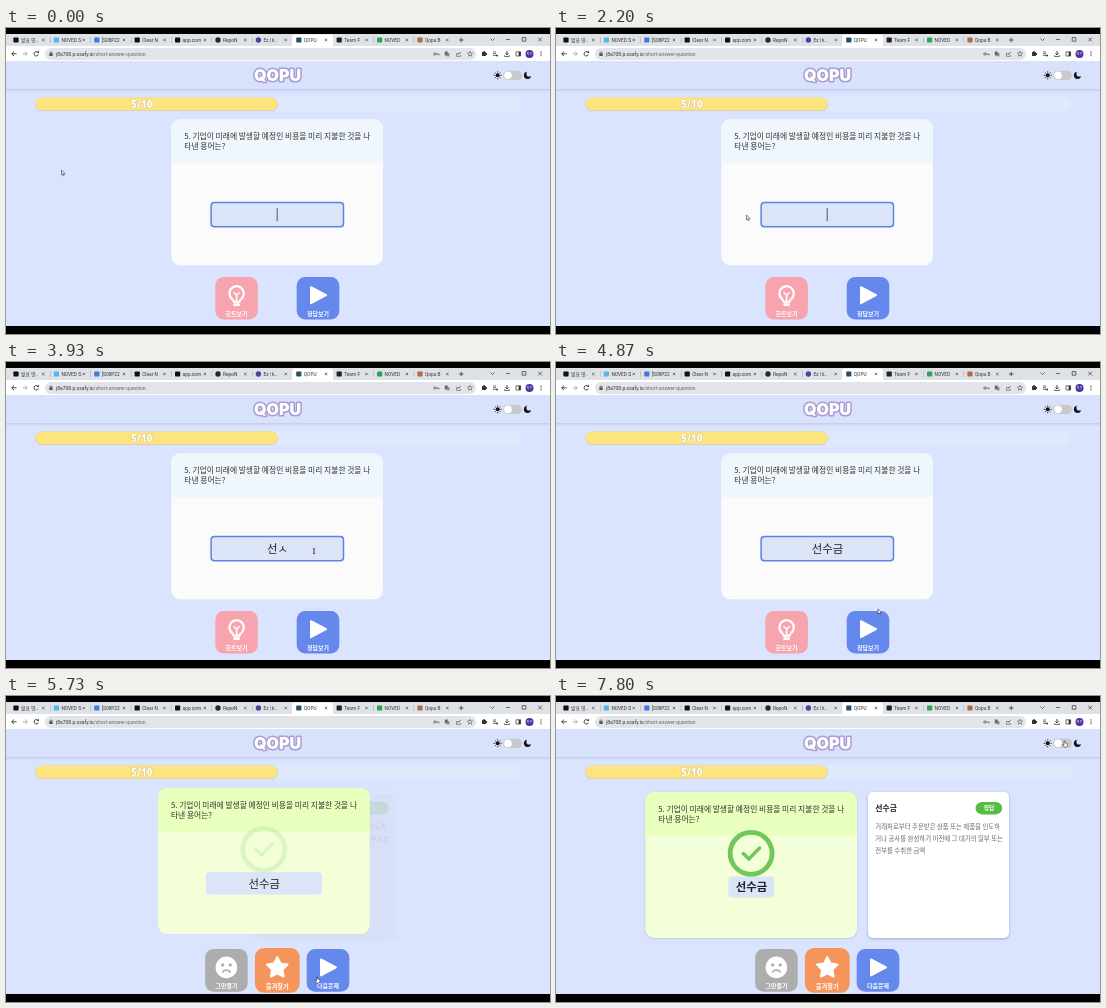
Write an HTML page with a canvas that moves like this. It is 544 px wide and 306 px high and loops after 7.87 s.

```html
<!DOCTYPE html>
<html lang="ko">
<head>
<meta charset="utf-8">
<title>QOPU</title>
<style>
html, body { margin: 0; width: 100%; height: 100%; overflow: hidden; background: #000; }
canvas { display: block; width: 100vw; height: 100vh; }
</style>
</head>
<body>
<canvas id="stage" width="544" height="306"></canvas>
<script>
const c = document.getElementById('stage').getContext('2d');
const LOOP = 7870, STEP = 200 / 3;
const KR = '"Noto Sans CJK KR", "Noto Sans CJK", sans-serif';
const UI = 'Roboto, "Noto Sans CJK KR", sans-serif';
const GREEN_AT = 5270, RESULT_AT = 5600;

const clamp = v => Math.max(0, Math.min(1, v));
const ease = v => { v = clamp(v); return v * v * (3 - 2 * v); };
const mix = (a, b, p) => a + (b - a) * p;
const blend = (a, b, p) => `rgb(${a.map((v, i) => Math.round(mix(v, b[i], p)))})`;

function rect(x, y, w, h, fill) {
  c.fillStyle = fill;
  c.fillRect(x, y, w, h);
}
function round(x, y, w, h, r, fill) {
  c.beginPath();
  c.roundRect(x, y, w, h, r);
  c.fillStyle = fill;
  c.fill();
}
function dot(x, y, r, fill) {
  c.beginPath();
  c.arc(x, y, r, 0, 7);
  c.fillStyle = fill;
  c.fill();
}
function ring(x, y, r, color, width, from = 0, to = Math.PI * 2) {
  c.beginPath();
  c.arc(x, y, r, from, to);
  c.strokeStyle = color;
  c.lineWidth = width;
  c.stroke();
}
function line(points, color, width) {
  c.beginPath();
  points.forEach(([x, y]) => c.lineTo(x, y));
  c.strokeStyle = color;
  c.lineWidth = width;
  c.stroke();
}
function poly(points, fill) {
  c.beginPath();
  points.forEach(([x, y]) => c.lineTo(x, y));
  c.closePath();
  c.fillStyle = fill;
  c.fill();
}
// y is the visual middle of the line
function text(s, x, y, size, color, { weight = 400, align = 'left', font = KR } = {}) {
  c.font = `${weight} ${size}px ${font}`;
  c.textAlign = align;
  c.fillStyle = color;
  c.fillText(s, x, y + size * 0.37);
}
function withShadow(color, blur, dy, draw) {
  c.save();
  c.shadowColor = color;
  c.shadowBlur = blur;
  c.shadowOffsetY = dy;
  draw();
  c.restore();
}

const tabs = [
  ['발표 영..', '#111'], ['NOVED S', '#55b5ee'], ['[S08P22', '#3d7de0'], ['Clear N', '#111'],
  ['app.com', '#111'], ['RepoN', '#24292e'], ['Ez | k..', '#4a459c'], ['QOPU', '#24506a'],
  ['Team F', '#222'], ['NOVED', '#2ba35b'], ['Qopu B', '#b06a45']
];

function drawBrowser() {
  rect(0, 6, 544, 12, '#dee1e6');
  rect(0, 18, 544, 15, '#fff');
  round(286, 6.5, 41, 13, [3, 3, 0, 0], '#fff');
  tabs.forEach(([name, color], i) => {
    const x = 10 + i * 40.4;
    if (i === 5 || i === 6) dot(x, 12, 2.7, color);
    else round(x - 2.6, 9.4, 5.2, 5.2, 0.8, color);
    text(name, x + 5, 12, 4.8, '#333', { font: UI });
    const k = x + 27.3;
    line([[k - 1.2, 10.8], [k + 1.2, 13.2]], '#444', 0.7);
    line([[k + 1.2, 10.8], [k - 1.2, 13.2]], '#444', 0.7);
    if (i < 10 && i !== 6 && i !== 7) rect(x + 34, 9, 0.5, 6, '#a5a8ad');
  });
  line([[453, 12], [457.5, 12]], '#333', 0.8);
  line([[455.2, 9.8], [455.2, 14.2]], '#333', 0.8);
  line([[484.5, 10.5], [486.5, 12.5], [488.5, 10.5]], '#333', 0.7);
  line([[500, 11.5], [504, 11.5]], '#333', 0.7);
  c.strokeRect(516.2, 9.6, 3.6, 3.6);
  line([[532.3, 9.7], [536, 13.4]], '#333', 0.7);
  line([[536, 9.7], [532.3, 13.4]], '#333', 0.7);

  line([[10.6, 25.8], [5.8, 25.8]], '#333', 0.9);
  line([[8, 23.5], [5.7, 25.8], [8, 28.1]], '#333', 0.9);
  line([[16.5, 25.8], [21.3, 25.8]], '#aaa', 0.9);
  line([[19, 23.5], [21.3, 25.8], [19, 28.1]], '#aaa', 0.9);
  ring(30.3, 25.8, 2.2, '#333', 0.9, 0.3, 5.5);
  poly([[30.8, 25], [33, 25], [33, 22.8]], '#333');

  round(39, 20, 431, 12, 6, '#e1e4e8');
  rect(43.3, 25.2, 3.4, 2.8, '#555');
  ring(45, 25, 1.1, '#555', 0.7, Math.PI, 0);
  const host = 'j8a708.p.ssafy.io';
  text(host, 50, 26, 5, '#333', { font: UI });
  text('/short-answer-question', 50 + c.measureText(host).width, 26, 5, '#666', { font: UI });

  ring(428.8, 26, 1.1, '#555', 0.8);
  line([[430, 26], [433, 26], [433, 27.3]], '#555', 0.8);
  round(438.8, 23.5, 3, 4, 0.4, '#666');
  rect(441, 25, 2.4, 3.4, '#888');
  line([[454, 25.5], [450.5, 25.5], [450.5, 28.3], [454.5, 28.3], [454.5, 27]], '#666', 0.7);
  line([[452, 26.6], [455, 24]], '#666', 0.7);
  c.strokeStyle = '#555';
  c.lineWidth = 0.6;
  star(464, 26, 2.7, 1.2);
  c.stroke();
  round(476, 24, 4, 4, 0.5, '#333');
  dot(478, 23.8, 0.9, '#333');
  dot(480.3, 26, 0.9, '#333');
  for (let i = 0; i < 3; i++) line([[487, 24 + i * 1.7], [490, 24 + i * 1.7]], '#333', 0.7);
  dot(491, 27.5, 1, '#333');
  line([[501, 23], [501, 26.8]], '#333', 0.9);
  line([[499.3, 25.2], [501, 27], [502.7, 25.2]], '#333', 0.8);
  line([[498.6, 27.2], [498.6, 28.5], [503.4, 28.5], [503.4, 27.2]], '#333', 0.7);
  c.strokeRect(510, 23.8, 4.6, 4.2);
  rect(512.6, 23.8, 2, 4.2, '#333');
  dot(523.5, 26, 4, '#4b2fa5');
  text('지우', 523.5, 26, 3.2, '#fff', { align: 'center' });
  for (let i = -1; i < 2; i++) dot(535, 25.8 + i * 1.9, 0.6, '#333');
}

function star(x, y, outer, inner) {
  c.beginPath();
  for (let i = 0; i < 10; i++) {
    const a = i * Math.PI / 5 - Math.PI / 2, r = i % 2 ? inner : outer;
    c.lineTo(x + r * Math.cos(a), y + r * Math.sin(a));
  }
  c.closePath();
}

function drawHeader() {
  rect(0, 33, 544, 265, '#dbe4fe');
  rect(0, 33, 544, 29, '#d9e2fc');
  rect(0, 61.4, 544, 1, '#b9c4e2');
  rect(0, 62.4, 544, 1, '#cfd9f5');

  c.font = '900 16px Inter, sans-serif';
  c.textAlign = 'center';
  c.strokeStyle = '#a99bd4';
  c.lineWidth = 3;
  c.strokeText('QOPU', 271.5, 53.2);
  c.fillStyle = '#fff';
  c.fillText('QOPU', 271.5, 53.2);

  dot(491.7, 47.3, 2, '#111');
  for (let i = 0; i < 8; i++) {
    const a = i * Math.PI / 4, x = Math.cos(a), y = Math.sin(a);
    line([[491.7 + x * 2.8, 47.3 + y * 2.8], [491.7 + x * 4, 47.3 + y * 4]], '#111', 0.9);
  }
  round(497, 42.8, 19, 9.2, 4.6, '#c9c9cb');
  dot(502, 47.4, 3.8, '#fff');
  dot(521.5, 47.3, 3.6, '#111');
  dot(523.3, 45.7, 2.9, '#d9e2fc');

  round(29.5, 68.5, 486, 15, 7.5, '#dfe9fb');
  withShadow('rgba(90,90,120,.35)', 1, 0.3, () => round(29.5, 69.5, 242, 13, 6.5, '#fde47c'));
  withShadow('rgba(60,60,60,.5)', 1, 0.7, () =>
    text('5/10', 135.7, 76.2, 9.6, '#fff', { weight: 800, align: 'center', font: '"Open Sans", sans-serif' }));
}

const icons = {
  bulb(x, y) {
    ring(x, y - 1.8, 7.2, '#fff', 2.3, 2.2, 7.2);
    line([[x - 4, y + 4], [x - 3, y + 6.5], [x + 3, y + 6.5], [x + 4, y + 4]], '#fff', 2);
    line([[x - 3, y - 3], [x, y], [x + 3, y - 3]], '#fff', 1.5);
    line([[x, y], [x, y + 6]], '#fff', 1.6);
    round(x - 3.3, y + 8, 6.6, 2.8, 1, '#fff');
  },
  play(x, y, tint = '#fff') {
    poly([[x - 7, y - 8], [x + 8, y], [x - 7, y + 8]], tint);
    line([[x - 7, y - 8], [x + 8, y], [x - 7, y + 8], [x - 7, y - 8], [x + 8, y]], tint, 2);
  },
  sad(x, y) {
    dot(x, y, 10.8, '#fff');
    dot(x - 3.8, y - 2.5, 1.6, '#adadad');
    dot(x + 3.8, y - 2.5, 1.6, '#adadad');
    ring(x, y + 7.3, 4.6, '#adadad', 1.6, 3.6, 5.82);
  },
  star(x, y) {
    star(x, y + 0.6, 10.2, 5.2);
    c.fillStyle = c.strokeStyle = '#fff';
    c.lineWidth = 2;
    c.fill();
    c.stroke();
  }
};

function button(x, y, color, icon, label, scale = 1, tint) {
  c.save();
  c.translate(x, y);
  c.scale(scale, scale);
  round(-21.3, -21.3, 42.6, 42.6, 8.5, color);
  icons[icon](0, -3, tint);
  text(label, 0, 15.1, 6, tint || '#fff', { weight: 700, align: 'center' });
  c.restore();
}

const typed = [[3400, 'ㅅ'], [3530, '서'], [3660, '선'], [3870, '선ㅅ'], [4000, '선수'], [4200, '선숙'], [4330, '선수그'], [4470, '선수금']];

function drawCard(t, p) {
  const g = clamp((t - GREEN_AT) / 130);
  const x = mix(165.3, 89.3, p), y = mix(91.3, 96, p);

  if (p > 0) {
    c.globalAlpha = p;
    const sx = mix(235, 312, p);
    withShadow('rgba(70,85,130,.4)', 3, 1, () => round(sx, 96, 141, 146, 5, '#fff'));
    text('선수금', sx + 7.3, 112, 7.8, '#222', { weight: 700 });
    round(sx + 107.6, 106, 26.5, 12.4, 6.2, '#59bb42');
    text('정답', sx + 121, 112.2, 5.8, '#fff', { weight: 700, align: 'center' });
    ['거래처로부터 주문받은 상품 또는 제품을 인도하', '거나 공사를 완성하기 이전에 그 대가의 일부 또는', '전부를 수취한 금액']
      .forEach((s, i) => text(s, sx + 7.3, 131 + i * 12, 6.4, '#666'));
    c.globalAlpha = 1;
  }

  const body = blend([251, 251, 252], [242, 255, 216], g);
  withShadow(`rgba(70,85,130,${0.25 * p})`, 2, 0.5, () => round(x, y, 211.7, 146, 9, body));
  round(x, y, 211.7, 44, [9, 9, 0, 0], blend([239, 246, 252], [232, 255, 190], g));
  text('5. 기업이 미래에 발생할 예정인 비용을 미리 지불한 것을 나', x + 13, y + 17.3, 7.75, '#333');
  text('타낸 용어는?', x + 13, y + 26.8, 7.75, '#333');

  const cx = x + 106, cy = mix(186.6, 191, p), w = mix(131.5, 46.5, p), h = mix(23.4, 21.6, p);
  if (t < GREEN_AT) round(cx - w / 2 - 1.2, cy - h / 2 - 1.2, w + 2.4, h + 2.4, 4, '#5b84e6');
  round(cx - w / 2 + 0.3, cy - h / 2 + 0.3, w - 0.6, h - 0.6, 3, '#dce5f8');

  const entry = typed.filter(k => k[0] <= t).pop();
  let end = cx - 0.2;
  if (entry) {
    text(entry[1], cx + 0.2, cy, 11.4, '#222', { weight: p > 0.5 ? 700 : 400, align: 'center' });
    end = cx + c.measureText(entry[1]).width / 2 + 0.5;
  }
  if (t < GREEN_AT && (t + 150) % 1060 < 530) rect(end - 0.4, cy - 6.5, 0.9, 13, '#3c4658');

  if (p > 0) {
    c.globalAlpha = p;
    ring(cx - 0.2, y + 61.3, 21, '#72c65b', 4.8);
    c.lineCap = c.lineJoin = 'round';
    line([[cx - 8, y + 61.5], [cx - 2.5, y + 67], [cx + 8.3, y + 56]], '#72c65b', 3.4);
    c.globalAlpha = 1;
  }
}

// time, x, y
const path = [
  [0, 55.5, 142], [500, 57, 146], [1300, 73, 185], [1700, 73, 185], [2700, 308, 189], [4350, 308, 189],
  [4870, 322, 247], [5130, 310.5, 281], [5750, 310.5, 281], [6600, 478, 101], [7000, 478, 101], [7700, 508, 45], [LOOP, 508, 45]
];

function pointer(t) {
  const i = path.findIndex((k, n) => n && t <= k[0]);
  const a = path[i - 1], b = path[i], e = ease((t - a[0]) / (b[0] - a[0]));
  return [mix(a[1], b[1], e), mix(a[2], b[2], e)];
}

const arrow = [[0, 0], [0, 5], [1.1, 4], [1.9, 5.7], [2.7, 5.3], [1.9, 3.7], [3.5, 3.6]];
const hand = [[0, 0], [1, 0], [1.2, 2], [3.4, 2.6], [3.4, 4.6], [2.7, 6], [0, 6], [-1.7, 3.7], [-1, 3.2], [0, 4]];

function drawPointer(x, y, kind) {
  if (kind === 'beam') {
    line([[x, y - 2.3], [x, y + 2.5]], '#222', 0.9);
    line([[x - 1.1, y - 2.4], [x + 1.1, y - 2.4]], '#222', 0.6);
    line([[x - 1.1, y + 2.6], [x + 1.1, y + 2.6]], '#222', 0.6);
    return;
  }
  const shape = (kind === 'hand' ? hand : arrow).map(([a, b]) => [x + a, y + b]);
  poly(shape, '#fff');
  line([...shape, shape[0]], '#333', 0.6);
}

function draw(t) {
  const p = ease((t - RESULT_AT) / 500);
  const [mx, my] = pointer(t);
  const inside = (x, y, w, h) => mx > x && mx < x + w && my > y && my < y + h;
  c.lineCap = 'butt';
  c.lineJoin = 'round';
  rect(0, 0, 544, 306, '#000');
  drawBrowser();
  drawHeader();
  drawCard(t, p);
  c.lineCap = 'butt';

  let kind = inside(497, 43, 19, 9) ? 'hand' : 'arrow';
  if (t < RESULT_AT) {
    const over = inside(291, 249, 42, 42);
    if (over) kind = 'hand';
    if (t < GREEN_AT && inside(205, 174, 133, 25)) kind = 'beam';
    button(230.6, 270.2, '#f7a4af', 'bulb', '힌트보기');
    button(312, 270.2, over ? '#5e81df' : '#6488eb', 'play', '정답보기', over ? 1.05 : 1, over ? '#e6ebf8' : undefined);
  } else {
    if (inside(301, 253, 42, 42)) kind = 'hand';
    button(220.4, 274.4, '#adadad', 'sad', '그만풀기');
    button(271.3, 274.4, '#f6955b', 'star', '즐겨찾기', 1.05);
    button(322, 274.4, '#6488eb', 'play', '다음문제');
  }
  drawPointer(mx, my, kind);
}

const start = performance.now();
function tick() {
  const t = (performance.now() - start) % LOOP;
  draw(Math.floor(t / STEP + 0.05) * STEP);
  requestAnimationFrame(tick);
}
tick();
</script>
</body>
</html>
```
